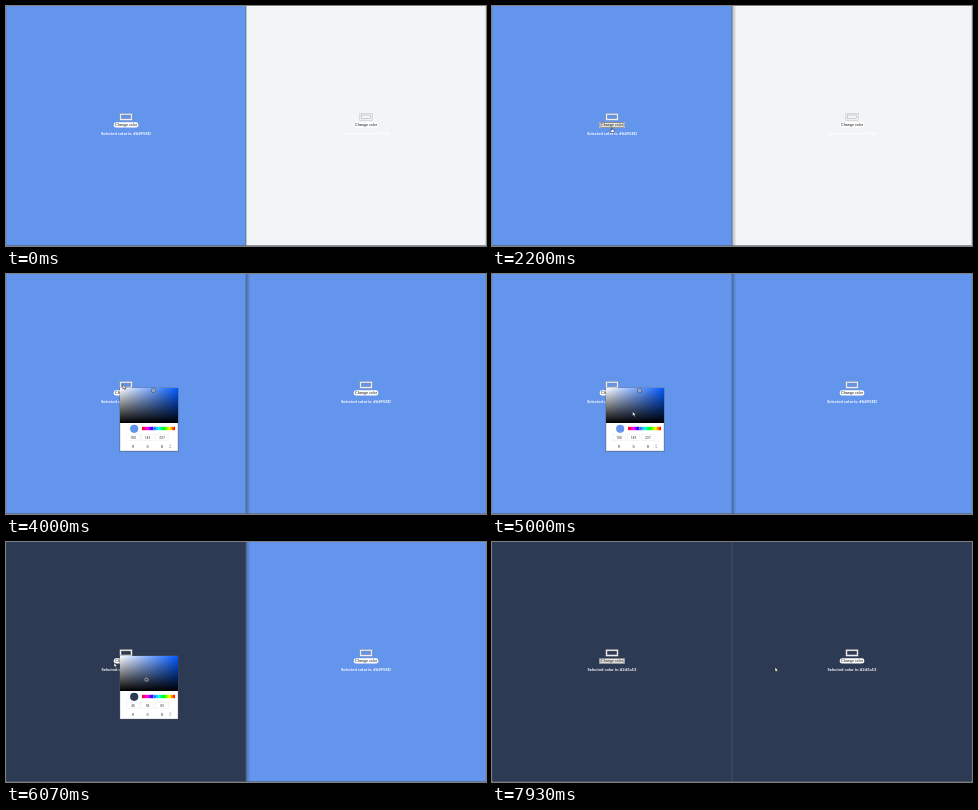
Animation of 480x240 px, one loop 8000 ms. Source, as an HTML page:

```html
<!DOCTYPE html>
<html lang="en">
<head>
<meta charset="utf-8">
<title>Shared colour picker</title>
<style>
  html, body { margin: 0; width: 100%; height: 100%; overflow: hidden; }
  svg { display: block; width: 480px; height: 240px; }
  .label { font: 700 4.2px Lato, sans-serif; fill: #fff; text-anchor: middle; }
  .btn { font: 3.7px "Liberation Sans", Arial, sans-serif; fill: #111; text-anchor: middle; }
  .num { font: 3.3px Roboto, sans-serif; fill: #333; text-anchor: middle; }
  .field { fill: #fff; stroke: #ddd; stroke-width: .3; }
</style>
</head>
<body>
<svg viewBox="0 0 480 240">
  <defs>
    <linearGradient id="sat"><stop stop-color="#fff"/><stop offset="1" stop-color="#0059ff"/></linearGradient>
    <linearGradient id="val" x2="0" y2="1"><stop stop-opacity="0"/><stop offset="1"/></linearGradient>
    <linearGradient id="hue"></linearGradient>
    <linearGradient id="shade"><stop stop-opacity=".26"/><stop offset="1" stop-opacity="0"/></linearGradient>
  </defs>
  <g id="panes"></g>
  <rect id="shadow" x="240" width="4.5" height="240" fill="url(#shade)"/>
  <rect x="239.5" width="1" height="240" fill="#505c70" opacity=".65"/>
  <path d="M0 239.5H480" stroke="#5c6474" opacity=".65"/>
  <path d="M.25 0V240M479.75 0V240" stroke="#5c6474" stroke-width=".5" opacity=".5"/>
  <g id="picker">
    <rect x="113.2" y="113.4" width="59.6" height="64.6" rx=".6" fill="#000" opacity=".2"/>
    <rect x="114" y="114" width="58" height="63" fill="#fff" stroke="#889" stroke-width=".4"/>
    <rect x="114" y="114" width="58" height="35" fill="url(#sat)"/>
    <rect x="114" y="114" width="58" height="35" fill="url(#val)"/>
    <g id="thumb" fill="none">
      <circle r="2" stroke="#222" stroke-width="1"/>
      <circle r="1.7" stroke="#fff" stroke-width=".6"/>
    </g>
    <circle id="dot" cx="128.2" cy="154.8" r="4.1"/>
    <rect x="136" y="152.8" width="33" height="3.4" fill="url(#hue)"/>
    <circle cx="148.9" cy="154.5" r="1.7" fill="#1662f5" stroke="#fff" stroke-width=".5"/>
    <g id="fields"></g>
    <path d="M163.4 171.7l.8-1 .8 1M163.4 172.9l.8 1 .8-1" fill="none" stroke="#444" stroke-width=".4"/>
  </g>
  <g id="cursor" stroke="#111" stroke-width=".45" fill="#fff" stroke-linejoin="round">
    <path id="arrow" d="M0 0V4.5L1.1 3.5 1.8 5.1 2.6 4.7 1.9 3.2H3.3Z"/>
    <path id="hand" d="M-.5.4Q0-.3.5.4V2L2 2.4Q2.5 2.6 2.4 3.3L1.9 5H-.7L-1.9 3Q-1.6 2.2-.5 3Z"/>
  </g>
</svg>
<script>
const $ = id => document.getElementById(id);
const LOOP = 8000;
const BLUE = '#6495ED', NAVY = '#2d3a53', PALE = '#f1f5f8';

// [time, x, y]: the pointer eases between neighbouring points
const path = [
  [330, 360, 4], [1200, 120, 124], [1330, 120, 124], [1730, 120, 121.5],
  [2800, 120, 121.5], [3200, 117, 110.5], [4200, 117, 110.5], [5000, 140.6, 137.6],
  [5660, 140.6, 137.6], [6070, 108, 120.7], [6400, 108, 120.7],
  [6930, 123, 121.3], [7600, 123, 121.3], [7930, 283, 125.2]
];

const hue = [];
for (let i = 0; i <= 6; i++)
  hue.push(`<stop offset="${i / 6}" stop-color="hsl(${360 - i * 60},100%,50%)"/>`);
$('hue').innerHTML = hue.join('');

const xs = [127, 141.5, 156];
$('fields').innerHTML = xs.map((x, i) =>
  `<rect class="field" x="${x - 6.3}" y="160.8" width="12.6" height="6"/>
   <text class="num value" x="${x}" y="165.2"></text>
   <text class="num" x="${x}" y="173.5">${'RGB'[i]}</text>`).join('');
const values = document.querySelectorAll('.value');

const pane = x => `<g transform="translate(${x})">
  <rect class="bg" width="240" height="240"/>
  <rect x="113.9" y="107.6" width="12.2" height="6.6" fill="#f0f0f0" stroke="#999" stroke-width=".3"/>
  <rect class="bg" x="115.2" y="109" width="9.6" height="3.8" stroke="#888" stroke-width=".35"/>
  <rect x="107.7" y="116.3" width="24.6" height="5.3" rx="2.4" fill="#fff"/>
  <g class="focus">
    <rect x="107.3" y="116" width="25.4" height="5.9" rx="1" fill="#fff"/>
    <rect x="107.9" y="116.5" width="24.2" height="4.9" rx=".7" fill="#e8e8e8" stroke="#222" stroke-width=".5"/>
  </g>
  <text class="btn" x="120" y="120.2">Change color</text>
  <text class="label" x="120" y="129.4"></text>
</g>`;
$('panes').innerHTML = pane(0) + pane(240);
const [left, right] = $('panes').children;

const show = (el, on) => { el.style.display = on ? '' : 'none'; };
const within = (t, a, b) => t >= a && t < b;

function paint(el, color, focused) {
  el.querySelectorAll('.bg').forEach(r => r.setAttribute('fill', color));
  el.querySelector('.label').textContent = 'Selected color is: ' + color;
  show(el.querySelector('.focus'), focused);
}

function pointer(t) {
  const i = path.findIndex(p => p[0] > t);
  if (i < 0) return path[path.length - 1].slice(1);
  if (i === 0) return path[0].slice(1);
  const [t0, x0, y0] = path[i - 1], [t1, x1, y1] = path[i];
  const u = (t - t0) / (t1 - t0), k = u * u * (3 - 2 * u);
  return [x0 + (x1 - x0) * k, y0 + (y1 - y0) * k];
}

function render(t) {
  const color = t < 5130 ? BLUE : NAVY;
  paint(left, color, within(t, 2130, 3730) || t >= 7130);
  paint(right, t < 2330 ? PALE : t < 7400 ? BLUE : NAVY, false);
  show($('shadow'), within(t, 2130, 7400));

  const rgb = [1, 3, 5].map(i => parseInt(color.slice(i, i + 2), 16));
  const max = Math.max(...rgb), min = Math.min(...rgb);
  show($('picker'), within(t, 3870, 6400));
  $('thumb').setAttribute('transform',
    `translate(${114 + 58 * (max - min) / max} ${114 + 35 * (1 - max / 255)})`);
  $('dot').setAttribute('fill', color);
  values.forEach((el, i) => { el.textContent = rgb[i]; });

  const [x, y] = pointer(t);
  const overButton = Math.abs(x - 120) < 12.4 && y > 116 && y < 122 && !within(t, 3870, 6400);
  show($('cursor'), t >= 400);
  show($('hand'), overButton);
  show($('arrow'), !overButton);
  $('cursor').setAttribute('transform', `translate(${x} ${y})`);
}

const start = performance.now();
function tick() {
  render((performance.now() - start) % LOOP);
  requestAnimationFrame(tick);
}
tick();
</script>
</body>
</html>
```
